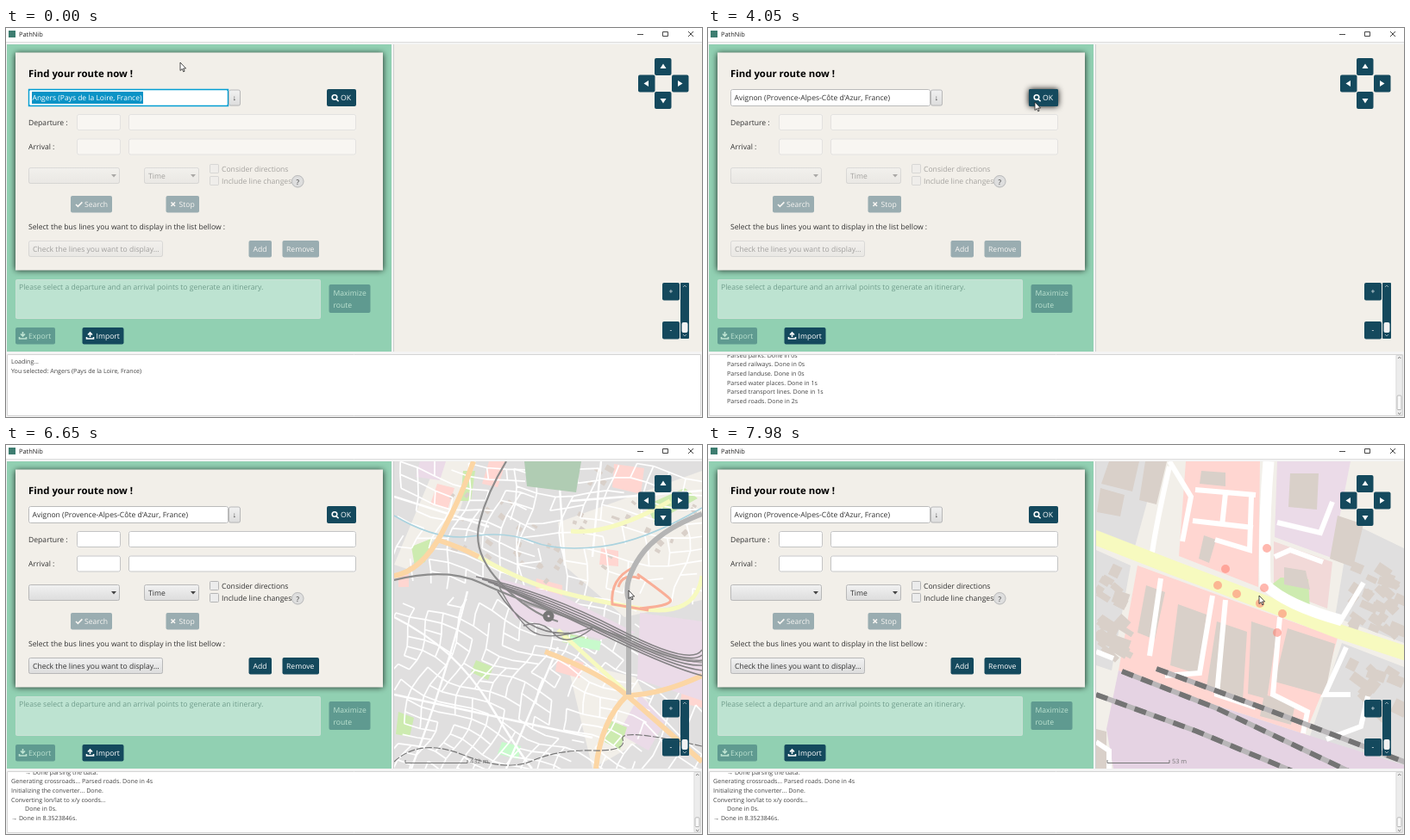
Write an HTML page with a canvas that moves like this. It is 807 px wide and 452 px high and loops after 8 s.

```html
<!DOCTYPE html>
<html lang="en">
<head>
<meta charset="utf-8">
<title>Route planner</title>
<style>
html, body { margin: 0; width: 100%; height: 100%; overflow: hidden; background: #fff; }
canvas { display: block; width: 807px; height: 452px; }
</style>
</head>
<body>
<canvas width="807" height="452"></canvas>
<script>
const c = document.querySelector('canvas').getContext('2d');
const LOOP = 8000, NAVY = '#14495d', CREAM = '#f2efe9', TAN = '#d9d0c9', PEACH = '#fcd6a4',
  WATER = '#aad3df', PINK = '#ffd6d1', MAUVE = '#ebdbe8', GREEN = '#cdebb0', YELLOW = '#f7fabf';
const MAP = [450, 19, 357, 357];

// ---- map building blocks ----
function random(seed) {
  return () => (seed = (seed * 16807) % 2147483647) / 2147483647;
}

function patches(seed, count, size, [x0, y0, w, h] = MAP) {
  const rnd = random(seed * 7919), path = new Path2D();
  for (let i = 0; i < count; i++) {
    const a = 0.3 + rnd() * 0.5, l = size * (0.5 + rnd()), s = size * (0.4 + 0.6 * rnd());
    const x = x0 + rnd() * w, y = y0 + rnd() * h, cos = Math.cos(a), sin = Math.sin(a);
    polygon(path, [[x, y], [x + l * cos, y + l * sin],
      [x + l * cos - s * sin, y + l * sin + s * cos], [x - s * sin, y + s * cos]]);
  }
  return path;
}
function polygon(path, points) {
  points.forEach(([x, y], i) => i ? path.lineTo(x, y) : path.moveTo(x, y));
  path.closePath();
}

// A bent street grid with rows of houses inside its cells.
function quarter(seed, gap, angle, [x0, y0, w, h] = MAP) {
  const rnd = random(seed * 7919), streets = new Path2D(), houses = new Path2D();
  const cos = Math.cos(angle), sin = Math.sin(angle), reach = Math.ceil(Math.max(w, h) / gap);
  const node = (i, j) => {
    const u = gap * (i + 0.35 * Math.sin(j * 0.8 + i * 0.5 + seed));
    const v = gap * (0.75 * j + 0.3 * Math.sin(i * 0.9 + j * 0.4 + seed));
    return [x0 + w / 2 + u * cos - v * sin, y0 + h / 2 + u * sin + v * cos];
  };
  for (let i = -reach; i <= reach; i++) for (let j = -reach; j <= reach; j++) {
    const [x, y] = node(i, j);
    if (x < x0 || y < y0 || x > x0 + w || y > y0 + h) continue;
    for (const end of [node(i + 1, j), node(i, j + 1)]) {
      if (rnd() > 0.75) continue;
      streets.moveTo(x, y);
      streets.lineTo(...end);
    }
    for (const b of [0.15, 0.58]) for (const a of [0.14, 0.42, 0.7]) {
      const right = a + 0.12 + 0.13 * rnd(), low = b + 0.14 + 0.16 * rnd();
      if (rnd() < 0.8) polygon(houses, [node(i + a, j + b), node(i + right, j + b), node(i + right, j + low), node(i + a, j + low)]);
    }
  }
  return { streets, houses };
}
const streets = (...args) => quarter(...args).streets;
function suburb(width, ...args) {
  const q = quarter(...args);
  return [[TAN, 0, q.houses], ['#fff', width, q.streets]];
}
const fan = (count, line) => Array.from({ length: count }, (_, i) => line(i)).join('');
const rail = (width, dash, d) => [['#b9b6b8', width, d], ['#747474', width, d, [dash, dash * .7]]];
const ground = color => [color, 0, 'M450 19h357v357h-357z'];

// Each entry: colour, line width (0 = fill), path, dash. Every layer is drawn at its own zoom level.
const city = [
  ground(CREAM),
  ['#eef0d5', 0, 'M450 60l40 50 50 20-40 45-50 15zM640 70l60-40 107-11v60l-100 20zM450 215l60-10 40 60-100-10zM660 225l147 10v60l-150-15zM600 19l50 0-30 30-35 20z'],
  ['#e8e6e5', 0, 'M462 19h125l-12 70-55 35-45-12-25-40zM560 180l120-10 110 20 17 60-110 20-120-10zM680 110l100-15 27 90-90 5z'],
  ['#e8e6e5', 0, 'M500 300l80 15-10 61h-70zM610 330l60-5 30 51h-95z'],
  ['#ffe3df', 0, patches(3, 34, 13, [530, 100, 277, 150])],
  ['#eee2ec', 0, patches(4, 26, 15, [500, 160, 300, 110])],
  ['#d5ecc0', 0, patches(5, 70, 9)],
  ['#a9d68f', 0, patches(6, 24, 8, [450, 70, 357, 90])],
  ['#fbf7c8', 0, patches(8, 30, 10, [480, 190, 250, 110])],
  ['#d2d0d0', .5, streets(9, 11, .4)],
  ['#c4c4c4', .5, streets(10, 7, .9, [465, 19, 110, 100])],
  ['#fff', 1, streets(11, 8, .2, [520, 100, 287, 180])],
  ['#fff', 1, streets(13, 10, .6)],
  [WATER, 13, 'M696 8Q655 28 620 55T575 97 545 142 500 185 440 211'],
  [WATER, 10, 'M812 45Q780 73 735 78T680 98 615 104 578 138 535 168 440 211'],
  [WATER, 12, 'M440 265Q500 282 560 285T660 297 740 313 812 330'],
  [WATER, 0, 'M680 297l55-2 72 25v18l-60-10-65-8z'],
  ['#e9e1cc', 2.5, 'M560 294Q620 296 660 312T812 345'],
  ['#c6c3b8', 0, 'M590 298l45 0 10 8-40 2z'],
  ['#cfcdcc', 0, 'M610 128Q615 108 645 107T682 128 672 153 640 160 612 150z'],
  ['#b4b4b4', .5, streets(12, 6, .5, [616, 114, 54, 40])],
  [PEACH, 2.5, 'M607 130Q612 105 645 104T685 128 674 156 640 163 610 152zM606 150L560 200 500 225 450 232M680 140L740 118 807 125M675 155L715 200 760 260 807 290M605 160L625 230 700 262'],
  [YELLOW, 1.6, 'M690 160l50 8 67-20M600 180l80 30 70-4M500 205l70 60'],
  ['#a2a2a2', 1.2, 'M582 19Q575 65 585 88T535 130 470 140 450 152M577 165Q545 195 520 222T465 246 450 245M807 100Q745 95 710 105T680 140 702 172M594 240Q650 208 720 215T807 218M594 245Q600 290 570 315T545 376M595 240Q610 270 660 272T807 262M740 190L807 210'],
  ['#7c7c7c', 2.5, 'M572 174Q590 164 625 165T685 168 740 190'],
  ['#7c7c7c', 6, 'M580 180Q588 195 588 208T594 232'],
  ['#888', 2.5, 'M566 185l24-10M594 230l0 35M694 162l45 28'],
];

const district = [
  ground('#e0dfdf'),
  [CREAM, 0, 'M640 90l167-60v150l-90 20-70-60zM500 19h45l-20 60-60 65-15-5zM650 250l80 20 30 60-80 46z'],
  [PINK, 0, 'M560 19l20 0-10 30-18-4zM500 45l20 5-8 25-20-6zM705 22l35 5-4 30-33-8zM615 155l30 8 0 22-32-8zM640 245l30 8-5 18-28-8zM690 120l20 3v18l-22-2zM785 275l22 5v25l-25-5zM455 150l12 0v15h-12z'],
  [MAUVE, 0, 'M480 19l30 0-7 22-28-4zM735 290l30 30-20 35-35-20z'],
  [GREEN, 0, 'M470 118l25-10-9 28-12 5zM742 70l45-20 15 12-50 28zM545 250l20 8-6 15-20-9zM645 218l30 6-2 10-28-5zM700 320l20 8-8 26-18-9zM530 30l14 0-5 35-12 0zM455 310l18 7-5 22-16-3z'],
  ['#c8facc', 0, 'M575 345l22 5-3 15-24-6z'],
  [TAN, 0, patches(21, 50, 7, [500, 19, 300, 150])],
  ['#fff', 1.7, streets(22, 19, .25, [450, 19, 150, 135])],
  ['#fff', 1.7, streets(23, 17, .4, [450, 175, 280, 201])],
  ['#fff', 1.7, streets(24, 23, .1, [585, 19, 222, 150])],
  ['#fff', 1.7, streets(25, 24, .6, [725, 270, 82, 106])],
  ['#fff', 2.4, 'M450 200Q520 235 560 300T610 376M470 376Q510 270 535 170M580 376L640 235M640 19L648 140M450 60L560 95M450 290L680 340M690 19L680 130M655 65l152-12'],
  ['#b0ccb3', 0, 'M601 19l66 0-6 36-57-7z'],
  [MAUVE, 0, 'M735 195l72 10v92l-75-25zM570 155l70 18 90 45-40 8-100-25z'],
  ['#c8facc', 0, 'M655 222l35 6-2 11-36-7z'],
  [WATER, 1.6, 'M450 82Q500 112 540 106T610 112 690 118 807 73'],
  [YELLOW, 5, 'M540 125Q590 155 630 167T735 190 807 152M655 100Q700 105 770 65M640 215Q700 270 722 290'],
  [PEACH, 6, 'M542 19Q528 60 505 103T450 152M500 110Q530 120 548 130M625 240Q690 265 720 291T807 368M720 291Q690 320 684 376M720 291Q760 290 807 268'],
  ['#f9ae97', 3, 'M728 142Q700 155 703 185L745 192M732 150Q760 170 769 178T735 190M710 165Q715 148 735 155'],
  ['#b5b5b5', 6, 'M807 80Q755 100 735 130T722 180L722 290'],
  ['#b3adb1', 4, 'M600 183Q650 196 700 220T807 252'],
  ['#8c8c8c', 2.2, 'M580 19Q558 55 549 90T573 160 640 205M450 157Q510 142 550 160T650 200 720 225'],
  ['#858385', 1.5, fan(6, i => `M${545 + i * 7} ${153 + i * 3}Q${625 + i * 5} ${170 + i * 6} 710 ${214 + i * 3}T807 ${238 + i * 6}`)],
  ['#858385', 1.4, 'M572 165Q590 200 608 215T680 212M600 210q20-8 35 9t45-6M570 170Q605 225 660 218'],
  ['#777', 5, 'M633 199a4 4 0 1 1-8 0a4 4 0 1 1 8 0'],
  ['#777', 1.2, 'M450 368Q480 340 530 360T610 367 680 355 715 342 807 350', [8, 2]],
];

const yard = [
  ground('#e0dfdf'),
  [CREAM, 0, 'M640 50l85 20 10 145-70-20zM500 19l130 0 15 55-60 20-80-30z'],
  [PINK, 0, 'M508 100l47 5-10 35-43-17zM610 108l32 3 0 92-38-20zM548 286l35-10 32 35-26 15zM650 265l60 20-20 25-40-10zM640 345l25 6-6 25-20-5z'],
  [MAUVE, 0, 'M645 130l25 6-5 52-22-6zM480 20l28 0-10 22-22-4z'],
  [GREEN, 0, 'M690 62l40-8-6 22-38 6zM740 115l25-5-18 38-15 30zM585 120l10 0-3 20-12-3z'],
  ...suburb(3, 31, 40, .25, [450, 45, 190, 120]),
  ...suburb(3, 32, 38, .15, [645, 30, 130, 160]),
  ...suburb(3, 33, 33, .5, [450, 225, 357, 160]),
  [CREAM, 0, 'M450 215l60 45 120 85 60 31h-25L450 240z'],
  [MAUVE, 0, 'M450 145L560 183 700 222 807 262V312L640 275 540 272 450 205zM735 225l40 8v30l-45-12z'],
  [TAN, 0, 'M500 195l50-8 90 35 60 35-60 16-60 20-60-35z'],
  ['#c8facc', 0, 'M621 284l48-4-3 25-46-2zM670 272l43-4 1 30-45 4z'],
  [GREEN, 0, 'M745 320l28 5v20l-30-4z'],
  ['#d0c5bc', 0, 'M520 72l46 12-8 36-42-10zM575 80l38 12-4 40-40-8zM585 150l25 6-5 32-24-8zM655 205l50 15-6 22-48-10zM568 295l20-8 13 18-18 8zM690 95l28 3-3 24-26-4z'],
  ['#fff', 5, 'M640 65Q648 120 643 188M643 75L740 70M450 250Q520 320 560 376M680 200L770 237M600 320L720 376'],
  [WATER, 4, 'M485 19Q520 48 585 48T700 38 807 23'],
  ['#6b9fb6', 1, 'M485 19Q520 48 585 48T700 38 807 23', [4, 3]],
  [YELLOW, 7, 'M497 122Q560 145 610 165T710 204 807 212'],
  [PEACH, 7, 'M450 220Q505 262 550 300T690 380'],
  ['#b5b5b5', 10, 'M815 45Q795 90 788 150T786 376'],
  [CREAM, 0, 'M736 203q-8-60 25-70t32-8l-14 70-10 15z'],
  ['#f9ae97', 6, 'M736 205Q725 155 755 140T800 118M738 207Q775 215 778 185L792 125'],
  ...rail(2.6, 9, fan(5, i => `M450 ${150 + i * 9}Q530 ${197 + i * 5} 640 ${224 + i * 5}T815 ${285 + i * 6}`)),
  ...rail(2.2, 8, 'M455 160Q545 265 620 262T720 262M458 175Q505 240 570 280M500 195Q600 240 700 258M470 170L525 245M555 270q30-15 65 4'),
  ['#777', 3, 'M532 248q-10-2-10 7t10 5M560 272l14-8M590 275q10-10 22 0'],
  ['#747474', 11, 'M586 231a11 11 0 1 1-22 0a11 11 0 1 1 22 0', [2.8, 1.3]],
];

const junction = [
  ground(CREAM),
  ['#e0dfdf', 0, 'M450 19h72L495 118 450 100zM450 122l40 18-22 122-18-6zM745 90l62 30v110l-80-30zM735 230l72 28v118l-110-35z'],
  [PINK, 0, 'M554 19h86l-2 146-92-36zM498 140L640 192 730 224 712 288 692 336 560 293 476 262z'],
  [MAUVE, 0, 'M660 19h85l-22 112-66-24z'],
  ['#f2d9d8', 0, 'M656 112l68 24-6 54-62-24z'],
  [GREEN, 0, 'M654 162l10-8 32 2 2 36-44-24z'],
  ['#e5d3e3', 0, 'M476 262L560 293 692 336 807 372V376H470L462 330z'],
  [TAN, 0, patches(41, 22, 15, [452, 135, 28, 100])],
  [TAN, 0, patches(42, 30, 14, [742, 135, 60, 75])],
  [TAN, 0, patches(43, 12, 17, [740, 245, 60, 60])],
  [TAN, 0, 'M465 19l35 0-8 35-36-9zM455 50l28 8-5 25-27-5zM507 19l25 0-12 50-20-5zM575 105l14 5-8 27-12-5zM508 163l22 8-12 55-20-8zM545 185l33 12-4 33-6 36-32-10zM590 205l35 12-5 80-42-15zM630 205l30 10-12 80-22-6zM672 213l55 18-12 60-58-16zM675 33l33 0-2 42-33-3zM668 142l25 4 5 22-30-6zM645 290l36 10-5 25-36-10zM572 30l28 2v16l-30-3zM730 82l30 10-12 50-27-10zM450 330l12 3v43h-12z'],
  ['#fff', 6, 'M535 25Q520 90 515 125M535 19L560 60 550 112M565 52L635 58M562 88L632 96M600 56l-4 38M630 60l-2 62-40-12M525 155L512 245M585 175L570 265 530 268M600 180l-10 110 45 15M663 200L655 290 695 310 690 335M660 90l50 12 14-36M657 130l18-8 38 14M740 235l-25 55 30 0M760 160l-30 50M450 240l20 8M717 342l40-15 8-35M450 345l15 10v21'],
  [YELLOW, 17, 'M445 106L540 143 640 181 730 216 812 243'],
  ['#fff', 13, 'M650 19Q644 90 646 162Q670 186 735 204'],
  ...rail(6, 14, 'M520 260L650 308 812 370M480 263L590 306 745 380M450 290L565 332 680 380'),
];

const layers = [city, district, yard, junction].map(layer =>
  layer.map(([color, width, path, dash = []]) => ({ color, width, dash, path: new Path2D(path) })));
const zooms = [
  { from: 6020, to: 6650, pivot: [704, 158], ratio: 3.704 },
  { from: 6650, to: 7700, pivot: [674, 172], ratio: 2.204 },
  { from: 7700, to: 7980, pivot: [639, 175], ratio: 3.698 },
];
const stops = [[648, 120], [600, 144], [591, 163], [613, 173], [645, 166], [640, 184], [666, 196], [660, 218]];

function drawLayer(layer, [px, py], scale, alpha) {
  c.save();
  c.globalAlpha = alpha;
  c.translate(px, py);
  c.scale(scale, scale);
  c.translate(-px, -py);
  c.beginPath();
  c.rect(...MAP);
  c.clip();
  for (const { color, width, dash, path } of layer) {
    c.fillStyle = c.strokeStyle = color;
    c.lineWidth = width;
    c.setLineDash(dash);
    width ? c.stroke(path) : c.fill(path);
  }
  c.restore();
}

function drawMap(t) {
  const i = Math.max(0, zooms.findLastIndex(z => t >= z.from)), { from, to, pivot, ratio } = zooms[i];
  const p = Math.min(1, Math.max(0, (t - from) / (to - from)));
  c.save();
  c.beginPath();
  c.rect(...MAP);
  c.clip();
  drawLayer(layers[i], pivot, ratio ** p, 1);
  if (p > 0) drawLayer(layers[i + 1], pivot, ratio ** (p - 1), Math.min(1, p * 1.6));
  if (i === 2) {
    c.fillStyle = 'rgba(255,125,110,.55)';
    for (const [x, y] of stops) {
      c.beginPath();
      c.arc(pivot[0] + (x - pivot[0]) * ratio ** (p - 1), pivot[1] + (y - pivot[1]) * ratio ** (p - 1), 5, 0, 7);
      c.fill();
    }
  }
  c.restore();
  const startWidth = [1600, 432, 196][i], metres = startWidth / ratio ** p;
  stroke('M463 366v3.5h72v-3.5', '#777', 1);
  text(metres >= 1000 ? (metres / 1000).toFixed(1) + ' km' : Math.round(metres) + ' m', 538, 370, '#777', 7.3);
}

// ---- interface ----
function text(s, x, y, color = '#333', size = 8.6, weight = 400, align = 'left') {
  c.font = `${weight} ${size}px "Open Sans", "Noto Sans", sans-serif`;
  c.textRendering = 'geometricPrecision';
  c.textAlign = align;
  c.fillStyle = color;
  c.fillText(s, x, y);
}
function stroke(d, color, width) {
  c.strokeStyle = color;
  c.lineWidth = width;
  c.stroke(new Path2D(d));
}
function fill(d, color) {
  c.fillStyle = color;
  c.fill(new Path2D(d));
}
function box(x, y, w, h, color, border, r = 2) {
  c.beginPath();
  c.roundRect(x, y, w, h, r);
  c.fillStyle = color;
  c.fill();
  if (!border) return;
  c.beginPath();
  c.roundRect(x + .5, y + .5, w - 1, h - 1, r);
  c.strokeStyle = border;
  c.lineWidth = 1;
  c.stroke();
}
function dimmed(enabled, draw) {
  c.globalAlpha = enabled ? 1 : .4;
  draw();
  c.globalAlpha = 1;
}
function glow(blur, color, draw) {
  c.save();
  c.shadowBlur = blur;
  c.shadowColor = color;
  draw();
  c.restore();
}

// Label colours; the last two are white faded into what lies behind a disabled button.
const ACTIVE = '#fff', OFF_CARD = '#f7f5f2', OFF_GREEN = '#bde3d1';

function button(x, y, w, h, label, labelX, ink, icon) {
  dimmed(ink === ACTIVE, () => box(x, y, w, h, NAVY));
  label.split('\n').forEach((line, i) => text(line, labelX, y + 13 + i * 14, ink));
  if (icon) stroke(icon, ink, 1.6);
}
function combo(x, y, w, label, arrow) {
  const g = c.createLinearGradient(0, y, 0, y + 19);
  g.addColorStop(0, '#f2f2f2');
  g.addColorStop(1, '#dcdcdc');
  box(x, y, w, 19, g, '#b8b8b8');
  text(label, x + 5, y + 13);
  if (arrow) fill(`M${x + w - 10} ${y + 8}h6l-3 3.5z`, '#444');
}

const CHOICE = "Avignon (Provence-Alpes-Côte d'Azur, France)", OLD_CHOICE = 'Angers (Pays de la Loire, France)';
const suggestions = [CHOICE, 'Avignonet (Auvergne-Rhône-Alpes, France)', 'Avignonet-Lauragais (Occitanie, France)',
  "Morières-lès-Avignon (Provence-Alpes-Côte d'Azur, France)", 'Villeneuve-lès-Avignon (Occitanie, France)',
  "Cabrières-d'Avignon (Provence-Alpes-Côte d'Azur, France)",
  "Saint-Saturnin-lès-Avignon (Provence-Alpes-Côte d'Azur, France)",
  'Avignon-lès-Saint-Claude (Bourgogne-Franche-Comté, France)'];
const PICK = 2600, SUBMIT = 3200, MAP_SHOWN = 4850, READY = 5050;
// Time, indent, line
const log = [
  [0, 0, 'Loading...'], [0, 0, 'You selected: ' + OLD_CHOICE], [PICK, 0, 'You selected: ' + CHOICE],
  [SUBMIT, 0, 'Loading the map...'], [SUBMIT, 0, 'Parsing the data...'], [3250, 16, 'Parsed buildings. Done in 0s'],
  [3450, 16, 'Parsed parks. Done in 0s'], [3450, 16, 'Parsed railways. Done in 0s'],
  [3650, 16, 'Parsed landuse. Done in 0s'], [3650, 16, 'Parsed water places. Done in 1s'],
  [3850, 16, 'Parsed transport lines. Done in 1s'], [4050, 16, 'Parsed roads. Done in 2s'],
  [4250, 16, '→ Done parsing the data.'], [4300, 0, 'Generating crossroads... Parsed roads. Done in 4s'],
  [4600, 0, 'Initializing the converter... Done.'], [4650, 0, 'Converting lon/lat to x/y coords...'],
  [READY, 16, 'Done in 0s.'], [READY, 0, '→ Done in 8.3523846s.'],
];
const pointer = [[0, 202, 40], [1700, 202, 40], [2150, 166, 106], [2640, 166, 106], [3200, 379, 86],
  [5180, 379, 86], [5460, 478, 104], [6020, 670, 160], [6650, 722, 169], [7700, 639, 175], [LOOP, 639, 175]];

function pointerAt(t) {
  const i = pointer.findIndex(k => k[0] > t), [t0, x0, y0] = pointer[i - 1], [t1, x1, y1] = pointer[i];
  const p = (t - t0) / (t1 - t0);
  return [x0 + (x1 - x0) * p, y0 + (y1 - y0) * p];
}

function drawWindow() {
  box(0, 0, 807, 452, '#fff', null, 0);
  box(0, 16, 807, 436, '#f4f4f4', null, 0);
  stroke('M0 16.5h807', '#ddd', 1);
  box(3, 3, 8, 8, '#3d7d70', null, 0);
  text('PathNib', 15, 10, '#222', 7.4);
  stroke('M732 7.5h7M761.5 4.5h6v5h-6zM791 4l6 6m0-6l-6 6', '#333', .9);
  box(1, 19, 446, 357, '#91d0b2', null, 0);
  box(...MAP, CREAM, null, 0);
  stroke('M449.5 19V376', '#d0d0d0', 1);
}

function drawForm(t, [px, py]) {
  const ready = t >= READY, focused = t < SUBMIT;
  glow(7, 'rgba(0,0,0,.85)', () => box(11, 28.5, 426, 253, CREAM, null, 0));
  text('Find your route now !', 26, 57, '#000', 11.4, 700);

  box(26, 71, 232, 20, '#fff', focused ? '#039ed3' : '#bbb');
  if (focused) stroke('M26.5 71.5h231v19h-231z', '#039ed3', 1.4);
  if (t < 500) {
    box(30, 74, 129, 14, '#0a93c6', null, 0);
    text(OLD_CHOICE, 30.5, 84, '#fff', 8.5);
  } else {
    const typed = t < PICK ? CHOICE.slice(0, Math.min(7, 1 + Math.floor((t - 500) / 200))) : CHOICE;
    text(typed, 30.5, 84);
    if (t < PICK) {
      const x = 31.5 + c.measureText(typed).width;
      stroke(`M${x} 74.5v13`, '#111', .9);
    }
  }
  combo(258, 71.5, 14, '', false);
  text('↓', 265, 84, '#333', 8.6, 400, 'center');

  const okInk = t < 500 || t >= PICK ? ACTIVE : OFF_CARD, hovered = px > 371 && px < 406 && py > 70 && py < 92;
  if (okInk === ACTIVE && hovered) glow(7, '#000', () => box(372, 71, 34, 20, NAVY));
  button(372, 71, 34, 20, 'OK', 388, okInk, 'M383.8 80.5a2.8 2.8 0 1 1-5.6 0a2.8 2.8 0 1 1 5.6 0M383 82.6l2.6 2.6');

  text('Departure :', 26, 112.5);
  text('Arrival :', 26, 141);
  dimmed(ready, () => {
    for (const y of [100, 128.5]) {
      box(82, y, 51, 19, '#fff', '#c4c4c4');
      box(142, y, 264, 19, '#fff', '#c4c4c4');
    }
    combo(26, 162, 106, '', true);
    combo(160, 162, 64, 'Time', true);
    for (const [y, label] of [[158, 'Consider directions'], [172, 'Include line changes']]) {
      box(236, y, 11, 11, '#ececec', '#b5b5b5', 1);
      text(label, 250, y + 9);
    }
    combo(26, 247, 156, 'Check the lines you want to display...', false);
  });
  box(331, 171, 14.5, 14.5, '#dedede', '#bbb', 7);
  text('?', 338.2, 182, '#333', 8, 400, 'center');
  button(75, 195, 48, 19.5, 'Search', 91, OFF_CARD, 'M81 205l2.4 2.4 5-5');
  button(185.5, 195, 38.5, 19.5, 'Stop', 200.5, OFF_CARD, 'M191.5 202.5l4.5 4.5m0-4.5l-4.5 4.5');
  text('Select the bus lines you want to display in the list bellow :', 26, 234);
  const editInk = ready ? ACTIVE : OFF_CARD;
  button(281.5, 247, 26.5, 19.5, 'Add', 286.5, editInk);
  button(320.5, 247, 42.5, 19.5, 'Remove', 325, editInk);

  dimmed(false, () => box(11, 292, 354, 46, '#fff', '#ddd'));
  text('Please select a departure and an arrival points to generate an itinerary.', 15, 304, '#709d8c');
  button(374.5, 298, 48, 33, 'Maximize\nroute', 379.5, OFF_GREEN);
  button(11, 348, 46, 19.5, 'Export', 26, OFF_GREEN, 'M19.5 353v5m-2.5-2.5l2.5 2.5 2.5-2.5M15.5 359v2h8v-2');
  button(88.5, 348, 48, 19.5, 'Import', 104.5, ACTIVE, 'M97.5 359v-5m-2.5 2.5l2.5-2.5 2.5 2.5M93.5 359v2h8v-2');
}

function drawSuggestions() {
  glow(6, 'rgba(0,0,0,.55)', () => box(26.5, 91, 268, 156, '#fff', null, 0));
  suggestions.forEach((s, i) => text(s, 30, 105.5 + i * 19, '#333'));
}

function drawMapControls() {
  const pads = [[752, 35, 'M758.5 47h7l-3.5-5.5z'], [733, 54.5, 'M745 61v7l-5.5-3.5z'],
    [772, 54.5, 'M779 61v7l5.5-3.5z'], [752, 74, 'M758.5 82h7l-3.5 5.5z']];
  for (const [x, y, arrow] of pads) {
    box(x, y, 19.5, 20, NAVY);
    fill(arrow, '#fff');
  }
  for (const [y, sign] of [[296, '+'], [341, '-']]) {
    box(761, y, 20, 20.5, NAVY);
    text(sign, 771, y + 13, '#fff', 8.6, 400, 'center');
  }
  box(782, 296, 10, 65, NAVY, null, 1);
  box(783.5, 342, 7, 12, '#f2f2f2');
  stroke('M785 301l2-2 2 2M785 356l2 2 2-2', '#8ba4ae', 1);
}

function drawConsole(t) {
  box(1, 379, 805, 72, '#fff', '#d4d4d4', 0);
  const lines = log.filter(l => l[0] <= t), overflow = lines.length > 5;
  c.save();
  c.beginPath();
  c.rect(2, 380, 803, 70);
  c.clip();
  lines.forEach(([, indent, s], i) => {
    const y = overflow ? 436 - (lines.length - 1 - i) * 10.65 : 390 + i * 10.65;
    text(s, 6 + indent, y, '#444', 7.1);
  });
  if (overflow) {
    box(797.5, 380, 8, 70, '#ececec', '#ddd', 0);
    const h = 210 / lines.length;
    box(798.5, 444 - h, 6, h, '#f8f8f8', '#b5b5b5', 1);
    stroke('M800 384l1.7-1.7 1.7 1.7M800 447l1.7 1.7 1.7-1.7', '#777', 1);
  }
  c.restore();
}

function drawPointer([x, y]) {
  const d = `M${x} ${y}v9.5l2.2-2 1.5 3.3 1.4-.6-1.5-3.2h3z`;
  fill(d, '#fff');
  stroke(d, '#222', .8);
}

function draw(time) {
  const t = time < 5180 ? time : 5180 + Math.floor((time - 5180) / 70) * 70;
  const at = pointerAt(t);
  c.clearRect(0, 0, 807, 452);
  drawWindow();
  if (t >= MAP_SHOWN) drawMap(t);
  drawMapControls();
  drawForm(t, at);
  if (t >= 1500 && t < PICK) drawSuggestions();
  drawConsole(t);
  drawPointer(at);
}

const start = performance.now();
function frame() {
  draw((performance.now() - start) % LOOP);
  requestAnimationFrame(frame);
}
frame();
</script>
</body>
</html>
```
